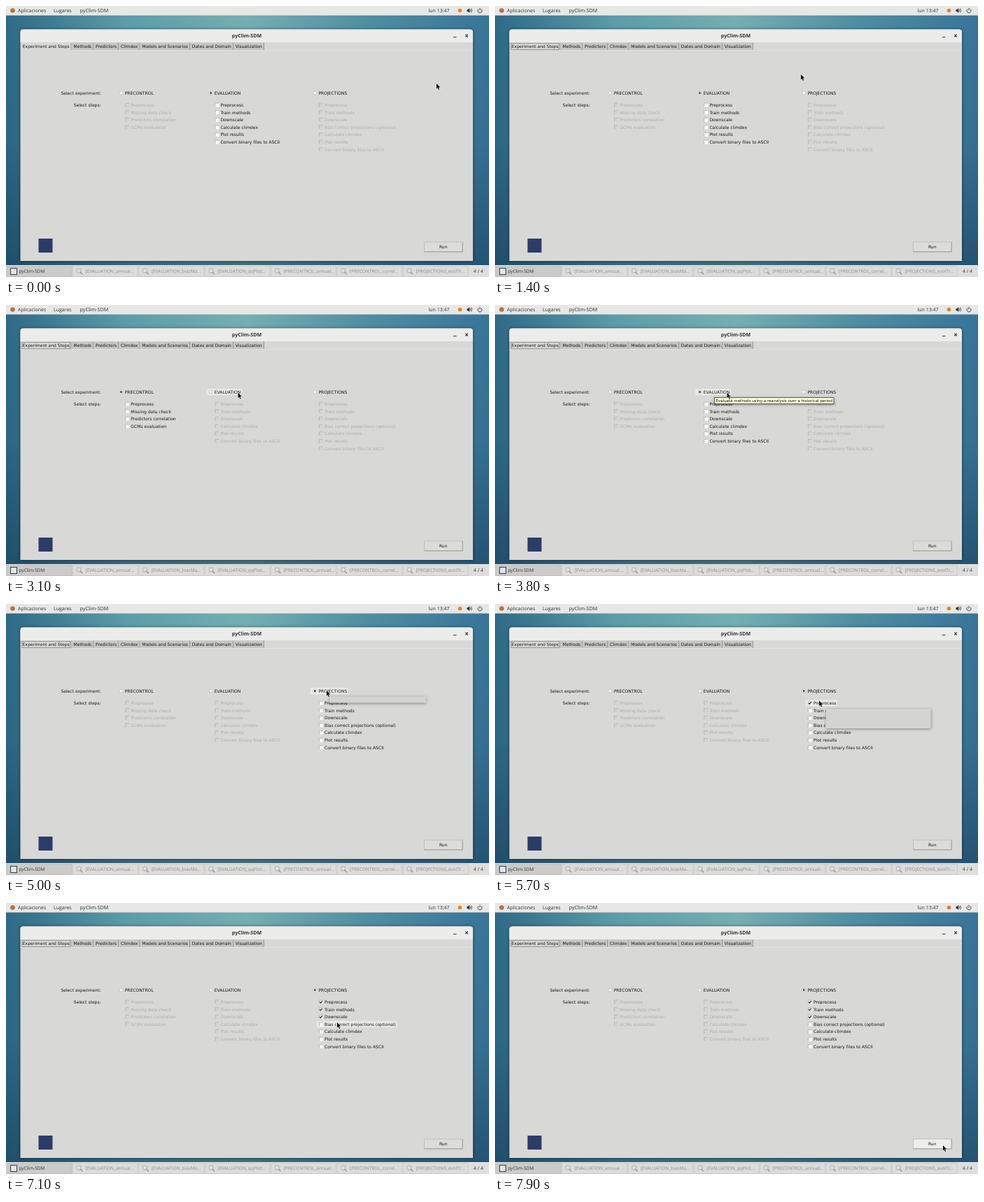
An HTML page with a canvas for the animation above (8 s loop, 690 by 388 pixels).

```html
<!DOCTYPE html>
<html lang="es">
<head>
<meta charset="utf-8">
<title>pyClim-SDM</title>
<style>
  html, body { margin: 0; width: 100%; height: 100%; overflow: hidden; }
  canvas { display: block; width: 690px; height: 388px; }
</style>
</head>
<body>
<canvas id="stage" width="690" height="388"></canvas>
<script>
const LOOP = 8000, STEP = 100;
const ctx = document.getElementById('stage').getContext('2d');
const UI = '6.04px "DejaVu Sans", sans-serif';
const TIP = '5.5px "DejaVu Sans", sans-serif';
const INK = '#161616', SHELL_INK = '#2e3436';
const shell = (size, weight = 400) => `${weight} ${size}px "Open Sans", "Noto Sans", sans-serif`;

const TABS = ['Experiment and Steps', 'Methods', 'Predictors', 'Climdex', 'Models and Scenarios',
              'Dates and Domain', 'Visualization'];
const TASKS = ['EVALUATION_annual', 'EVALUATION_biasMa', 'EVALUATION_qqPlot',
               'PRECONTROL_annual', 'PRECONTROL_correl', 'PROJECTIONS_evolTr'];

const [PRECONTROL, EVALUATION, PROJECTIONS] = [
  { name: 'PRECONTROL', x: 164.5,
    steps: ['Preprocess', 'Missing data check', 'Predictors correlation', 'GCMs evaluation'] },
  { name: 'EVALUATION', x: 292.6,
    steps: ['Preprocess', 'Train methods', 'Downscale', 'Calculate climdex', 'Plot results',
            'Convert binary files to ASCII'] },
  { name: 'PROJECTIONS', x: 441.2,
    steps: ['Preprocess', 'Train methods', 'Downscale', 'Bias correct projections (optional)',
            'Calculate climdex', 'Plot results', 'Convert binary files to ASCII'] }
];
const EXPERIMENTS = [PRECONTROL, EVALUATION, PROJECTIONS];
const RADIO_Y = 124.5, STEP_INDENT = 8.8;
const rowY = i => 141.7 + 10.62 * i;

// Pointer trips. A trip to an experiment, or to one of its steps, ends in a tooltip and a click.
const HOME = [615, 111];
const TRIPS = [
  { depart: 800, arrive: 1200, to: [579, 101] },
  { depart: 1300, arrive: 1400, to: [437, 98] },
  { depart: 1500, arrive: 2200, to: [196, 127], click: 2300, experiment: PRECONTROL,
    tip: ['Evaluation of predictors and GCMs previous to dowscaling'] },
  { depart: 2700, arrive: 3100, to: [331.5, 125.5], click: 3500, experiment: EVALUATION,
    tip: ['Evaluate methods using a reanalysis over a historical period'] },
  { depart: 3900, arrive: 4200, to: [458, 124], click: 4500, experiment: PROJECTIONS,
    tip: ['Apply methods to downscale climate projections'] },
  { depart: 5000, arrive: 5300, to: [463, 138.5], click: 5700, experiment: PROJECTIONS, step: 0,
    tip: ['Prepare all predictors and predictands.', 'This step must be run once before training',
          'and downscaling. Preprocessed data will be storaged', 'in the results/ directory.'] },
  { depart: 5700, arrive: 5900, to: [465, 150], click: 6200, experiment: PROJECTIONS, step: 1,
    tip: ['Train all selected methods. If you are',
          'working in a HPC, you can assign several resources to',
          'each method by editing the lib/launch_jobs.py', 'file.'] },
  { depart: 6200, arrive: 6400, to: [466, 164], click: 6400, experiment: PROJECTIONS, step: 2,
    tip: ['Apply all selected methods. If you are',
          'working in a HPC, you can assign different configuration',
          '(number of nodes, memory, etc) to each method by editing the',
          'lib/launch_jobs.py file. Dowscaled data will be storaged in the',
          'results/ directory.'] },
  { depart: 6700, arrive: 7100, to: [473, 171] },
  { depart: 7200, arrive: 7700, to: [652, 349] },
  { depart: 7800, arrive: 7900, to: [640, 347] }
];

const smooth = p => p * p * (3 - 2 * p);

function pointerAt(t) {
  return TRIPS.reduce(([x, y], { depart, arrive, to }) => {
    const p = smooth(Math.min(1, Math.max(0, (t - depart) / (arrive - depart))));
    return [x + (to[0] - x) * p, y + (to[1] - y) * p];
  }, HOME);
}

function rect(x, y, w, h, fill, stroke, lineWidth = 0.7) {
  if (fill) { ctx.fillStyle = fill; ctx.fillRect(x, y, w, h); }
  if (stroke) { ctx.strokeStyle = stroke; ctx.lineWidth = lineWidth; ctx.strokeRect(x, y, w, h); }
}

function disc(x, y, r, fill, stroke) {
  ctx.beginPath();
  ctx.arc(x, y, r, 0, 2 * Math.PI);
  if (fill) { ctx.fillStyle = fill; ctx.fill(); }
  if (stroke) { ctx.strokeStyle = stroke; ctx.lineWidth = 0.6; ctx.stroke(); }
}

function line(d, stroke, width = 1) {
  ctx.strokeStyle = stroke;
  ctx.lineWidth = width;
  ctx.stroke(new Path2D(d));
}

function text(string, x, y, font = UI, color = INK, align = 'left') {
  ctx.font = font;
  ctx.textAlign = align;
  ctx.fillStyle = color;
  ctx.fillText(string, x, y);
}

function widthOf(string, font = UI) {
  ctx.font = font;
  return ctx.measureText(string).width;
}

function gradient(x, y, ...colors) {
  const g = ctx.createLinearGradient(0, 0, x, y);
  colors.forEach((c, i) => g.addColorStop(i / (colors.length - 1), c));
  return g;
}

function desktop() {
  rect(0, 0, 690, 388, gradient(690, 0, '#2e6a88', '#5c9ea9', '#75b0b3', '#4f8fa2', '#38759a'));
  rect(0, 0, 690, 388, gradient(0, 388, '#10355000', '#10355018', '#10355090'));
}

function topBar() {
  rect(0, 0, 690, 13.5, '#e7e7e5');
  disc(9.5, 6.5, 3.3, '#b5713f');
  text('Aplicaciones', 17, 9, shell(7), SHELL_INK);
  text('Lugares', 68, 9, shell(7), SHELL_INK);
  text('pyClim-SDM', 105.5, 9, shell(7.2), SHELL_INK);
  text('lun 13:47', 603.5, 9, shell(7), SHELL_INK);
  disc(648.5, 6.5, 2.7, '#e8801c');

  ctx.fillStyle = SHELL_INK;
  ctx.fill(new Path2D('M658.5 5h1.5l2.3-2v7l-2.3-2h-1.5z'));
  line('M663.3 5q1 1.5 0 3M664.6 3.5q2 3 0 6', SHELL_INK, 0.8);
  line('M675.1 4.5a3 3 0 1 0 3.8 0M677 2.8v3.7', SHELL_INK, 0.9);
}

function taskBar() {
  rect(0, 371, 690, 17, '#dededc');
  rect(0, 371, 690, 0.8, '#f2f2f0');
  rect(1, 372.5, 93, 15, '#cbcbc9', '#b4b4b2');
  rect(6.5, 375.5, 9, 9, '#e4e6e8', '#3a4550', 1.1);
  text('pyClim-SDM', 18.5, 382.3, shell(6.5), SHELL_INK);
  TASKS.forEach((name, i) => {
    const x = 95.5 + 94.4 * i;
    rect(x, 372.5, 92.8, 15, '#dcdcda', '#c2c2c0');
    rect(x + 5, 375, 8, 8, '#cfcfcd');
    disc(x + 8.5, 379, 2.8, '#e2e2e0', '#a2a2a0');
    line(`M${x + 10.5} 381l3.3 3.3`, '#969694', 1.4);
    text(`[${name}...`, x + 18, 382.3, shell(6.5), '#8a8c8b');
  });
  text('4 / 4', 668, 382.3, shell(6.8), SHELL_INK);
}

function appWindow(t, [px, py]) {
  ctx.shadowColor = '#0008';
  ctx.shadowBlur = 4;
  ctx.fillStyle = '#d8d8d6';
  ctx.beginPath();
  ctx.roundRect(20.5, 33.5, 646.5, 331.5, [4, 4, 0, 0]);
  ctx.fill();
  ctx.shadowBlur = 0;
  ctx.fillStyle = '#ececea';
  ctx.beginPath();
  ctx.roundRect(20.5, 33.5, 646.5, 18.5, [4, 4, 0, 0]);
  ctx.fill();
  text('pyClim-SDM', 344, 45, shell(7.1, 700), SHELL_INK, 'center');
  line('M639 44.5h4.5M656.3 40.7l3.6 3.6m0-3.6l-3.6 3.6', SHELL_INK, 1.2);

  tabs(t);
  rect(46.5, 333, 20, 20, '#2c3c68');

  const overRun = px >= 597 && px <= 652 && py >= 338 && py <= 352;
  rect(597.5, 338, 54.5, 13.8, overRun ? '#eeeeec' : '#dcdcda', '#b4b4b2');
  line('M597.5 352h54.8v-14', '#8f8f8d', 0.7);
  text('Run', 624.7, 347.2, UI, INK, 'center');
}

function tabs(t) {
  rect(20.5, 63.2, 646.5, 0.7, '#e6e6e4');
  let x = 21;
  TABS.forEach((label, i) => {
    const w = widthOf(label) + 5.8;
    rect(x, 52.5, w, i ? 10.4 : 11.4, i ? '#c6c6c4' : '#d8d8d6');
    rect(x + w - 0.9, 52.5, 0.8, 10.4, '#8c8c8a');
    text(label, x + 2.8, 59.9);
    if (i === 0 && t >= 200) rect(x + 2, 53.6, w - 4, 8.8, null, '#6a6a68', 0.6);
    x += w;
  });
}

// Label of a radio button or check box, lit while the pointer is over it.
function option(label, x, y, gap, enabled, [px, py]) {
  const left = x - 6.3, top = y - 4.6, w = widthOf(label) + gap + 7.5, h = 9.3;
  if (enabled && px >= left && px <= left + w && py >= top && py <= top + h) {
    rect(left, top, w, h, '#e9e9e7');
  }
  text(label, x + gap, y + 2.2, UI, enabled ? INK : '#adadab');
}

function checkBox(x, y, enabled, checked) {
  rect(x - 2.8, y - 2.8, 5.6, 5.6, enabled ? '#fbfbf9' : '#d4d4d2');
  line(`M${x - 2.6} ${y + 2.8}v-5.4h5.4`, enabled ? '#a0a09e' : '#adadab', 0.7);
  if (checked) line(`M${x - 1.8} ${y}l1.3 1.6l2.4-3.2`, '#111', 1.1);
}

function form(t, pointer) {
  text('Select experiment:', 135.6, 126.7, UI, INK, 'right');
  text('Select steps:', 135.6, 143.9, UI, INK, 'right');

  const clicks = TRIPS.filter(trip => trip.click <= t);
  const choices = clicks.filter(trip => trip.step === undefined);
  const { experiment: selected, click: since } = choices.at(-1) ?? { experiment: EVALUATION, click: 0 };
  const previous = choices.at(-2)?.experiment ?? EVALUATION;

  for (const experiment of EXPERIMENTS) {
    const { name, x, steps } = experiment;
    const active = experiment === selected;
    option(name, x, RADIO_Y, 5.2, true, pointer);
    disc(x, RADIO_Y, 2.5, '#f6f6f4', '#adadab');
    if (active) disc(x, RADIO_Y, 1.2, '#111');

    steps.forEach((label, i) => {
      // The rows of the abandoned column are repainted in two passes.
      const stale = experiment === previous && t < since + STEP && i > 1;
      const enabled = active || stale;
      const checked = clicks.some(trip => trip.experiment === experiment && trip.step === i);
      option(label, x + STEP_INDENT, rowY(i), 5, enabled, pointer);
      checkBox(x + STEP_INDENT, rowY(i), enabled, checked);
    });
  }
}

// Appears just after arrival; on departure the text goes first, then the box.
function tooltip(t) {
  const index = TRIPS.findLastIndex(trip => trip.tip && t >= trip.arrive + STEP);
  if (index < 0) return;
  const { tip, experiment, step } = TRIPS[index];
  const leave = TRIPS[index + 1].depart;
  if (t >= leave + STEP) return;

  const onStep = step !== undefined;
  const x = experiment.x + 21 + (onStep ? STEP_INDENT + 1.5 : 0);
  const y = (onStep ? rowY(step) : RADIO_Y) + 8.2;
  const w = Math.max(...tip.map(string => widthOf(string, TIP))) + 4;
  const h = 6.5 * tip.length + 2.2;
  const empty = t >= leave;
  ctx.shadowColor = '#0006';
  ctx.shadowBlur = 4;
  ctx.shadowOffsetY = 1;
  rect(x, y, w, h, empty ? '#d4d4d2' : '#ffffdc');
  ctx.shadowBlur = ctx.shadowOffsetY = 0;
  if (empty) return;
  rect(x, y, w, h, null, '#22221c');
  tip.forEach((string, i) => text(string, x + 1.9, y + 6.3 + 6.5 * i, TIP, '#111'));
}

function drawPointer([x, y]) {
  const arrow = new Path2D(`M${x} ${y}v7.6l1.7-1.5l1.2 2.8l1.2-.5l-1.2-2.8l2.4-.1z`);
  ctx.strokeStyle = '#f0f0ee';
  ctx.lineWidth = 0.9;
  ctx.stroke(arrow);
  ctx.fillStyle = '#0a0a0a';
  ctx.fill(arrow);
}

function draw(time) {
  const t = Math.floor((time % LOOP) / STEP) * STEP;
  const pointer = pointerAt(t);
  ctx.textRendering = 'geometricPrecision';
  desktop();
  topBar();
  taskBar();
  appWindow(t, pointer);
  form(t, pointer);
  tooltip(t);
  drawPointer(pointer);
}

let origin;
function frame(now) {
  origin ??= now;
  draw(now - origin);
  requestAnimationFrame(frame);
}
draw(0);
requestAnimationFrame(frame);
</script>
</body>
</html>
```
